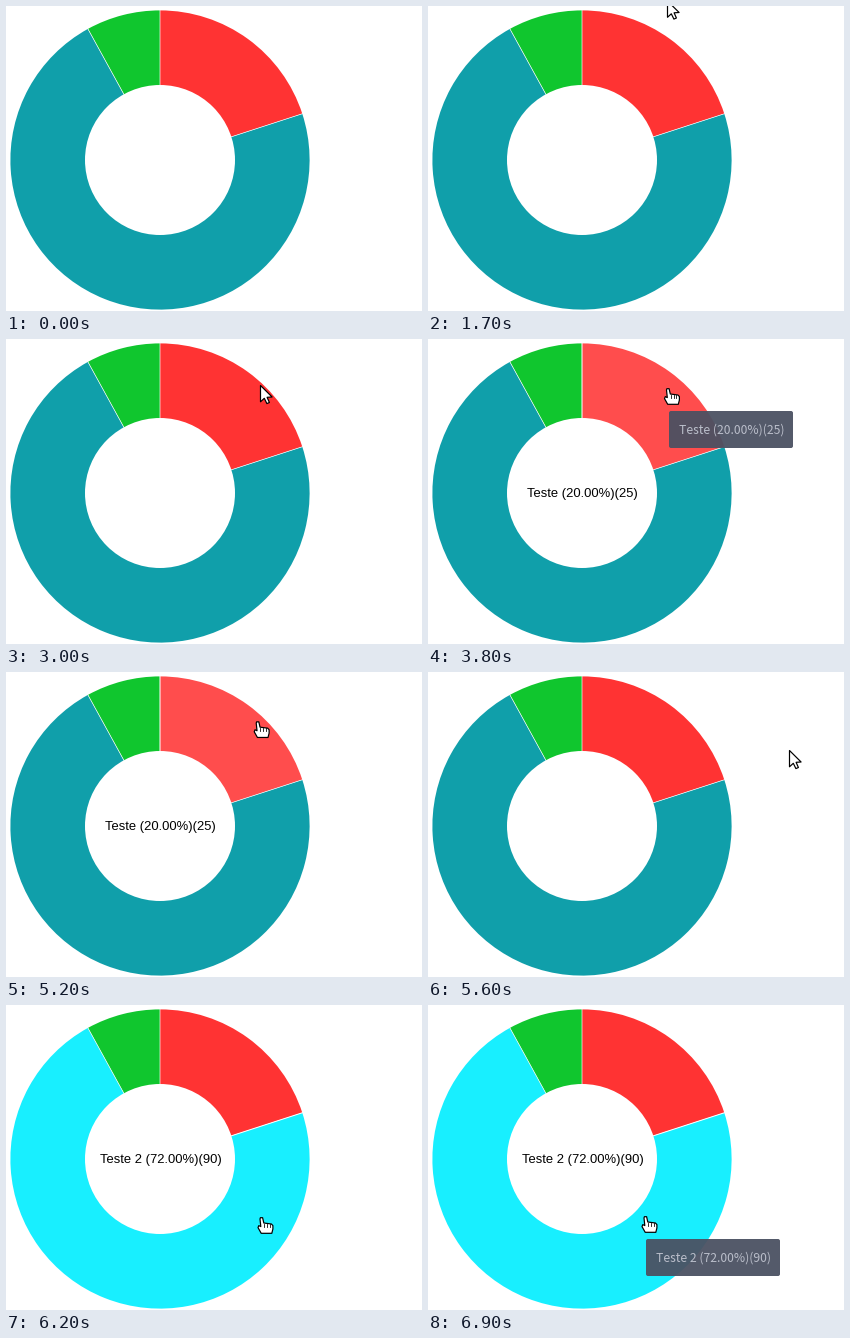
Write a matplotlib script that moves like this. It is 416 px wide and 305 px high and loops after 8 s.

```python
import numpy as np
import matplotlib.pyplot as plt
from matplotlib.animation import FuncAnimation
from matplotlib.patches import Circle, FancyBboxPatch, Polygon, Wedge

W, H, DPI = 416, 305, 64
PX = 72 / DPI  # points per pixel
STEP, LOOP = 100, 8000
CX = CY = 154
R_OUT, R_IN = 149.6, 75

# name, value, colour
DATA = [
    ("Teste", 25, (255, 51, 51)),
    ("Teste 2", 90, (16, 159, 170)),
    ("Teste 3", 10, (16, 198, 46)),
]
VALUES = np.array([value for _, value, _ in DATA])
ENDS = np.cumsum(VALUES) / VALUES.sum()
STARTS = np.append(0, ENDS[:-1])

# pointer key points: time, x, y; a repeated place is a rest
KEYS = np.array([
    (900, 131, -13), (1700, 239.5, -5.5), (2100, 304, 29),
    (2400, 284, 43), (2500, 284, 43), (3000, 254.5, 46),
    (3300, 240.5, 49), (5100, 240.5, 49), (5600, 361.5, 78),
    (6000, 323, 188), (6200, 256, 212), (6300, 218, 211),
    (LOOP, 218, 211),
])
TIMES, SPOTS = KEYS[:, 0], KEYS[:, 1:]
SPEED = np.gradient(SPOTS, TIMES, axis=0)
rest = np.all(np.diff(SPOTS, axis=0) == 0, axis=1)
SPEED[np.append(rest, False) | np.append(False, rest)] = 0

# tooltip: shown from, until, box width
TIPS = [(3800, 5200, 124), (6900, LOOP, 134)]

ARROW = np.array([
    (0, 0.5), (0, 16.8), (3.8, 13.3), (6.4, 18.6), (8.9, 17.5),
    (6.6, 12.3), (11.6, 12),
])
HAND = np.array([
    (-1.6, 0.7), (0.6, 0.7), (1.8, 6), (9.4, 7), (10.9, 8.6),
    (10.9, 12), (9.8, 16.3), (-0.8, 16.3), (-4, 10.6), (-3.2, 8.6),
    (-1.2, 9.6), (-2, 2),
])
KNUCKLES = (2.2, 5, 7.8)


def rgb(color, gain=1.0):
    return tuple(min(c * gain, 255) / 255 for c in color)


def caption(i):
    name, value, _ = DATA[i]
    return f"{name} ({100 * value / VALUES.sum():.2f}%)({value})"


def spot(t):
    """Pointer place on a smooth curve through the key points."""
    t = np.clip(t, TIMES[0], TIMES[-1])
    k = min(np.searchsorted(TIMES, t, side="right"), len(TIMES) - 1) - 1
    span = TIMES[k + 1] - TIMES[k]
    u = (t - TIMES[k]) / span
    ease = u * u * (3 - 2 * u)
    bend = u * (1 - u) * ((1 - u) * SPEED[k] - u * SPEED[k + 1])
    return SPOTS[k] + ease * (SPOTS[k + 1] - SPOTS[k]) + span * bend


def slice_at(x, y):
    dx, dy = x - CX, y - CY
    if not R_IN < np.hypot(dx, dy) < R_OUT:
        return None
    turn = np.arctan2(dx, -dy) / (2 * np.pi) % 1
    return int(np.searchsorted(ENDS, turn, side="right"))


fig = plt.figure(figsize=(W / DPI, H / DPI), dpi=DPI, facecolor="white")
ax = fig.add_axes([0, 0, 1, 1])
ax.set_xlim(0, W)
ax.set_ylim(H, 0)
ax.axis("off")

slices, edges = [], []
for (_, _, color), start, end in zip(DATA, STARTS, ENDS):
    slices.append(ax.add_patch(Wedge(
        (CX, CY), R_OUT, 360 * start - 90, 360 * end - 90,
        fc=rgb(color), ec="none", lw=0, zorder=1)))
    a = 2 * np.pi * start
    edges += ax.plot([CX, CX + 150 * np.sin(a)], [CY, CY - 150 * np.cos(a)],
                     color="white", snap=False, zorder=2)
ax.add_patch(Circle((CX, CY), R_IN, fc="white", ec="none", lw=0, zorder=3))

label = ax.text(154.5, 158, "", ha="center", va="baseline", color="black",
                family="Liberation Sans", fontsize=13 * PX, zorder=4)

tip_box = ax.add_patch(FancyBboxPatch(
    (0, 0), 1, 37, boxstyle="round,pad=0,rounding_size=2",
    fc=rgb((75, 81, 98)), ec="none", lw=0, alpha=0.95, zorder=5))
tip_text = ax.text(0, 0, "", ha="left", va="baseline",
                   color=rgb((186, 190, 202)), family="Noto Sans CJK JP",
                   fontsize=12.15 * PX, zorder=6)

pointer = ax.add_patch(Polygon(ARROW, closed=True, fc="white", ec="black",
                               lw=1.2 * PX, joinstyle="round", zorder=7))
ticks = [ax.plot([], [], color="black", lw=0.8 * PX, zorder=8)[0]
         for _ in KNUCKLES]


def draw(frame):
    t = frame * STEP
    x, y = spot(t)
    hot = slice_at(*spot(t - STEP))  # the chart reacts one step late

    for i, (wedge, edge) in enumerate(zip(slices, edges)):
        wedge.set_facecolor(rgb(DATA[i][2], 1.5 if i == hot else 1))
        edge.set_linewidth((1 if i == hot else 0.65) * PX)
    text = "" if hot is None else caption(hot)
    label.set_text(text)

    width = next((w for on, off, w in TIPS if on <= t < off), 0)
    tip_box.set_visible(width > 0)
    tip_box.set_bounds(np.ceil(x), y + 23, width, 37)
    tip_text.set_text(text if width else "")
    tip_text.set_position((np.ceil(x) + 10, y + 46))

    pointer.set_visible(t >= TIMES[0])
    pointer.set_xy((ARROW if hot is None else HAND) + (x, y))
    for tick, dx in zip(ticks, KNUCKLES):
        tick.set_data([x + dx, x + dx], [y + 7, y + 10])
        tick.set_visible(hot is not None)
    return [*slices, *edges, label, tip_box, tip_text, pointer, *ticks]


anim = FuncAnimation(fig, draw, frames=LOOP // STEP, interval=STEP,
                     init_func=lambda: draw(0), repeat=True, repeat_delay=0,
                     blit=False)
plt.show()
```
